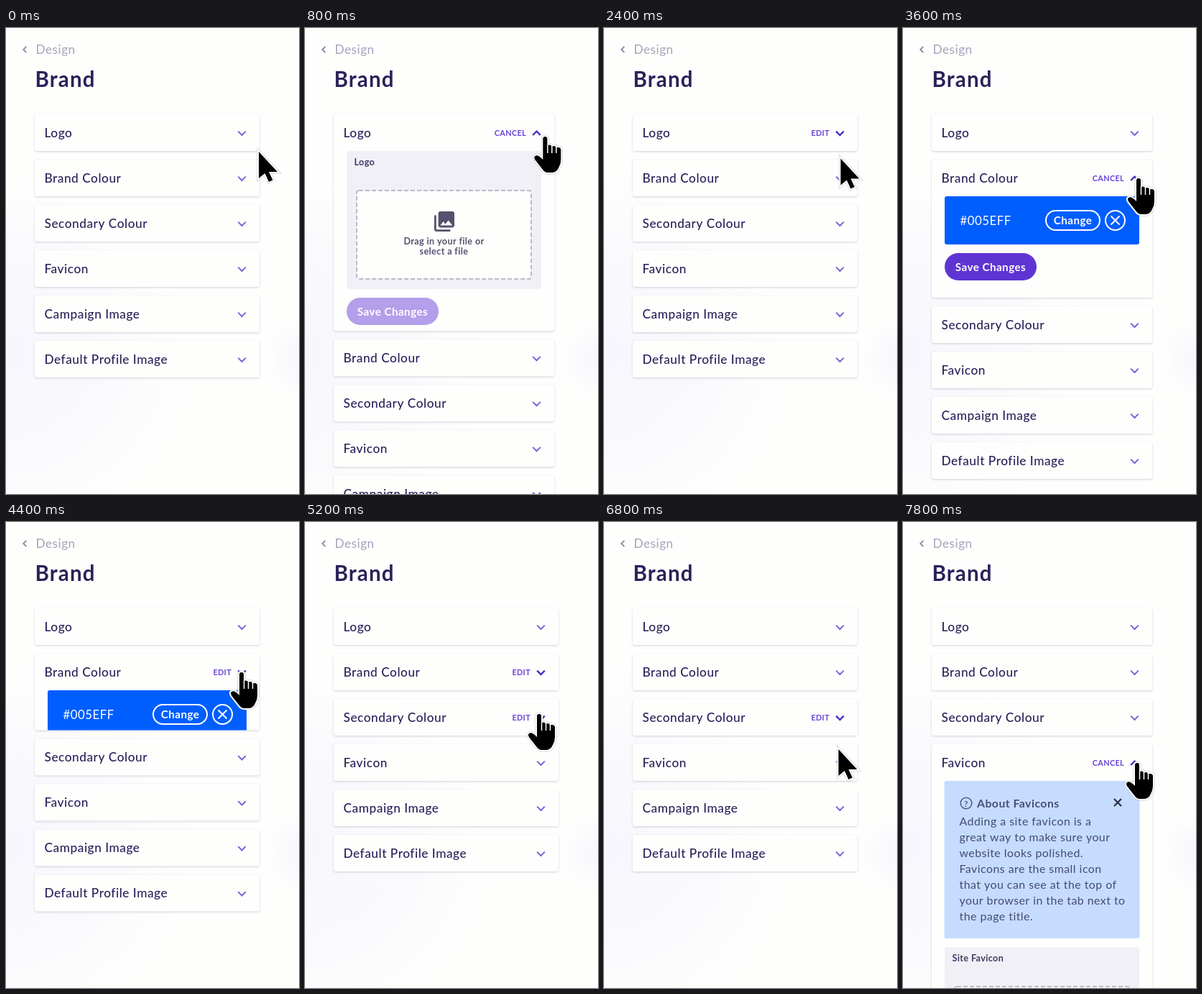
Write an HTML page with a canvas that moves like this. It is 408 px wide and 648 px high and loops after 8000 ms.

```html
<!DOCTYPE html>
<html lang="en">
<head>
<meta charset="utf-8">
<title>Brand settings</title>
<style>
html, body { margin: 0; width: 100%; height: 100%; overflow: hidden; background: #fefefd; }
canvas { display: block; width: 408px; height: 648px; }
</style>
</head>
<body>
<canvas id="stage"></canvas>
<script>
const W = 408, H = 648, LOOP = 8000, STEP = 200;
const INK = '#2a2259', VIOLET = '#5e35d3', MUTED = '#7a64d4', SLATE = '#55526f';
const LEFT = 40, TOP = 120, HEAD = 51, GAP = 12, SLIDE = 350;

const canvas = document.getElementById('stage');
const ctx = canvas.getContext('2d');
const dpr = window.devicePixelRatio || 1;
canvas.width = W * dpr;
canvas.height = H * dpr;

// Each card: title, body height, time opened and closed, body painter
const cards = [
  { title: 'Logo', body: 265, open: 500, close: 1600, paint: (y, r) => uploadBody('Logo', y, r) },
  { title: 'Brand Colour', body: 141, open: 2900, close: 4200, paint: (y, r) => colourBody('#005EFF', y, r) },
  { title: 'Secondary Colour', body: 141, open: 5400, close: 6250, paint: (y, r) => colourBody('#12275C', y, r) },
  { title: 'Favicon', body: 496, open: 7250, close: LOOP, paint: faviconBody },
  { title: 'Campaign Image' },
  { title: 'Default Profile Image' }
];

// time, x, y, hand
const path = [
  [0, 352, 170, 0], [200, 342, 157, 1], [400, 335, 150, 1], [1600, 333, 150, 1],
  [2000, 333, 150, 1], [2200, 331, 161, 1], [2400, 329.5, 179.5, 0], [2600, 328, 196, 1],
  [2800, 328, 208, 1], [4600, 328, 208, 1], [4800, 328, 217, 1], [5000, 327, 238, 0],
  [5200, 326, 266, 1], [6400, 326, 266, 1], [6600, 326, 284, 1], [6800, 326.5, 314, 0],
  [7000, 326, 328, 1], [7200, 326, 334, 1], [LOOP, 326, 334, 1]
];

const HAND = new Path2D('M-3 4Q-3 1 0 1Q3 1 3 4V14Q3 12.5 6 12.5Q9 12.5 9 15.5Q9 14 12 14Q15 14 15 17' +
  'Q15 16 18 16Q22 16 22 19.5V33Q22 39 19 44Q16 51 10 51H4Q-1 51-4 46L-13.5 34Q-17 29-13 27.5Q-9 26.5-3 33Z');
const ARROW = new Path2D('M0 2V39L8.5 32L14 44L19.5 41.5L14 30H26Z');
const GALLERY = new Path2D('M22 16V4c0-1.1-.9-2-2-2H8c-1.1 0-2 .9-2 2v12c0 1.1.9 2 2 2h12c1.1 0 2-.9 2-2z' +
  'm-11-4l2.03 2.71L16 11l4 5H8l3-4zM2 6v14c0 1.1.9 2 2 2h14v-2H4V6H2z');

const ease = p => p * p * (3 - 2 * p);
const clamp = v => Math.max(0, Math.min(1, v));

function text(str, x, y, size, color, weight = 400, align = 'left', spacing = 0.03) {
  ctx.font = `${weight} ${size}px Lato, sans-serif`;
  ctx.letterSpacing = `${size * spacing}px`;
  ctx.textAlign = align;
  ctx.fillStyle = color;
  ctx.fillText(str, x, y);
}

function box(x, y, w, h, r, color) {
  ctx.beginPath();
  ctx.roundRect(x, y, w, h, r);
  if (color) {
    ctx.fillStyle = color;
    ctx.fill();
  }
}

function line(points, color, width) {
  ctx.beginPath();
  points.forEach(([x, y]) => ctx.lineTo(x, y));
  ctx.strokeStyle = color;
  ctx.lineWidth = width;
  ctx.stroke();
}

function cross(x, y, s, color, width) {
  line([[x - s, y - s], [x + s, y + s]], color, width);
  line([[x + s, y - s], [x - s, y + s]], color, width);
}

function ring(x, y, r, color, width) {
  ctx.beginPath();
  ctx.arc(x, y, r, 0, Math.PI * 2);
  ctx.strokeStyle = color;
  ctx.lineWidth = width;
  ctx.stroke();
}

function saveButton(y, color) {
  box(58, y, 128, 38, 19, color);
  text('Save Changes', 122, y + 24.5, 15.2, '#fff', 700, 'center');
}

function uploadBody(label, y, right) {
  const w = right - 76, mid = 58 + w / 2;
  box(58, y, w, 192, 4, '#f1f0f6');
  text(label, 68.5, y + 20, 12.6, '#3f3a63', 700);
  box(72, y + 55, w - 28, 123, 3, '#fefefd');
  ctx.setLineDash([6, 3]);
  ctx.strokeStyle = '#bcbac8';
  ctx.lineWidth = 2;
  ctx.stroke();
  ctx.setLineDash([]);
  ctx.save();
  ctx.translate(mid - 16.3, y + 81.2);
  ctx.scale(1.4, 1.4);
  ctx.fillStyle = SLATE;
  ctx.fill(GALLERY);
  ctx.restore();
  text('Drag in your file or', mid, y + 130, 12.6, SLATE, 700, 'center');
  text('select a file', mid, y + 144, 12.6, SLATE, 700, 'center');
  saveButton(y + 204, '#b39fea');
}

function colourBody(hex, y, right) {
  const r = right - 18;
  box(58, y, r - 58, 67, 3, hex);
  text(hex, 79.5, y + 40, 16.8, '#fff');
  box(r - 130, y + 20, 75, 27, 13.5);
  ctx.strokeStyle = '#fff';
  ctx.lineWidth = 2;
  ctx.stroke();
  text('Change', r - 92.5, y + 39, 15.2, '#fff', 700, 'center');
  ring(r - 33.5, y + 33.5, 13.5, '#fff', 2);
  cross(r - 33.5, y + 33.5, 6, '#fff', 2);
  saveButton(y + 79, VIOLET);
}

function faviconBody(y, right) {
  const about = ['Adding a site favicon is a', 'great way to make sure your', 'website looks polished.',
    'Favicons are the small icon', 'that you can see at the top of', 'your browser in the tab next to', 'the page title.'];
  box(57.5, y, right - 75, 219, 3, '#c5dcfe');
  ring(88, y + 31, 7.8, '#565b86', 1.6);
  text('?', 88, y + 35.5, 12, '#565b86', 700, 'center');
  text('About Favicons', 103, y + 37, 15.8, '#4a4d77', 700);
  cross(right - 48, y + 30, 5, '#2b2b45', 2.2);
  about.forEach((s, i) => text(s, 78.5, y + 62 + i * 22, 15.9, '#454a70'));
  uploadBody('Site Favicon', y + 231, right);
}

function chevron(x, y, up, active) {
  const d = up ? -2.7 : 2.7;
  line([[x - 5.3, y - d], [x, y + d], [x + 5.3, y - d]], active ? '#4f2cc4' : MUTED, active ? 2.4 : 2);
}

function glow(x, y, rx, ry, alpha) {
  ctx.save();
  ctx.translate(x, y);
  ctx.scale(rx, ry);
  const g = ctx.createRadialGradient(0, 0, 0, 0, 0, 1);
  g.addColorStop(0, `rgba(244,244,253,${alpha})`);
  g.addColorStop(0.6, `rgba(246,246,253,${alpha * 0.6})`);
  g.addColorStop(1, 'rgba(249,249,254,0)');
  ctx.fillStyle = g;
  ctx.fillRect(-1, -1, 2, 2);
  ctx.restore();
}

function backdrop() {
  ctx.fillStyle = '#fefefd';
  ctx.fillRect(0, 0, W, H);
  glow(0, 450, 260, 250, 0.8);
  glow(412, 460, 55, 55, 0.7);
  ctx.lineCap = 'butt';
  line([[28.3, 25.8], [24.2, 30], [28.3, 34.2]], '#8d86a8', 1.8);
  text('Design', 41.5, 35.5, 17.2, '#a8a2bb');
  text('Brand', 40.5, 81.5, 29.5, INK, 700, 'left', 0.04);
}

function openness(c, t) {
  if (!c.body) return 0;
  return t < c.close ? ease(clamp((t - c.open) / SLIDE)) : 1 - ease(clamp((t - c.close) / SLIDE));
}

function pointerAt(t) {
  const i = path.findIndex(k => k[0] > t) - 1;
  const [t0, x0, y0, hand] = path[i], [t1, x1, y1] = path[i + 1];
  const p = (t - t0) / (t1 - t0);
  return { x: x0 + (x1 - x0) * p, y: y0 + (y1 - y0) * p, hand };
}

function drawPointer({ x, y, hand }) {
  const shape = hand ? HAND : ARROW;
  ctx.save();
  ctx.translate(x, y);
  ctx.lineJoin = hand ? 'round' : 'miter';
  ctx.lineWidth = 5;
  ctx.strokeStyle = 'rgba(120,120,130,.45)';
  ctx.stroke(shape);
  ctx.lineWidth = 4;
  ctx.strokeStyle = '#fff';
  ctx.stroke(shape);
  ctx.fillStyle = '#000';
  ctx.fill(shape);
  if (hand) [3.5, 9.5, 15.5].forEach((fx, i) => line([[fx, 13 + i], [fx, 24]], '#fff', 1.5));
  ctx.restore();
}

function drawCard(c, y, right, t, focused, pointer) {
  const grown = openness(c, t) * (c.body || 0);
  ctx.save();
  ctx.shadowColor = 'rgba(40,40,80,.2)';
  ctx.shadowBlur = 3 * dpr;
  ctx.shadowOffsetY = dpr;
  box(LEFT, y, right - LEFT, HEAD + grown, 3, '#fefefd');
  ctx.restore();

  const isOpen = t >= c.open && t < c.close;
  const hover = pointer.hand && pointer.y >= y && pointer.y < y + HEAD;
  const active = isOpen || focused || hover;
  text(c.title, 53.5, y + 32, 17.3, INK, 500);
  if (active) text(isOpen ? 'CANCEL' : 'EDIT', right - 39, y + 30, 10.9, '#6a45d6', 700, 'right');
  chevron(right - 24.5, y + 26.3, isOpen, active);

  if (grown > 0) {
    ctx.save();
    ctx.beginPath();
    ctx.rect(LEFT, y + HEAD, right - LEFT, grown);
    ctx.clip();
    c.paint(y + HEAD, right);
    ctx.restore();
  }
  return HEAD + grown + GAP;
}

function draw(t) {
  ctx.setTransform(dpr, 0, 0, dpr, 0, 0);
  backdrop();
  const pointer = pointerAt(t);
  const extra = cards.reduce((sum, c) => sum + openness(c, t) * (c.body || 0), 0);
  const right = extra > 70 ? 347 : 353; // room for the scrollbar
  const focused = cards.filter(c => c.open <= t).pop();
  let y = TOP;
  for (const c of cards) y += drawCard(c, y, right, t, c === focused, pointer);
  drawPointer(pointer);
}

function tick() {
  const t = performance.now() % LOOP;
  draw(Math.floor(t / STEP) * STEP);
  requestAnimationFrame(tick);
}
tick();
</script>
</body>
</html>
```
